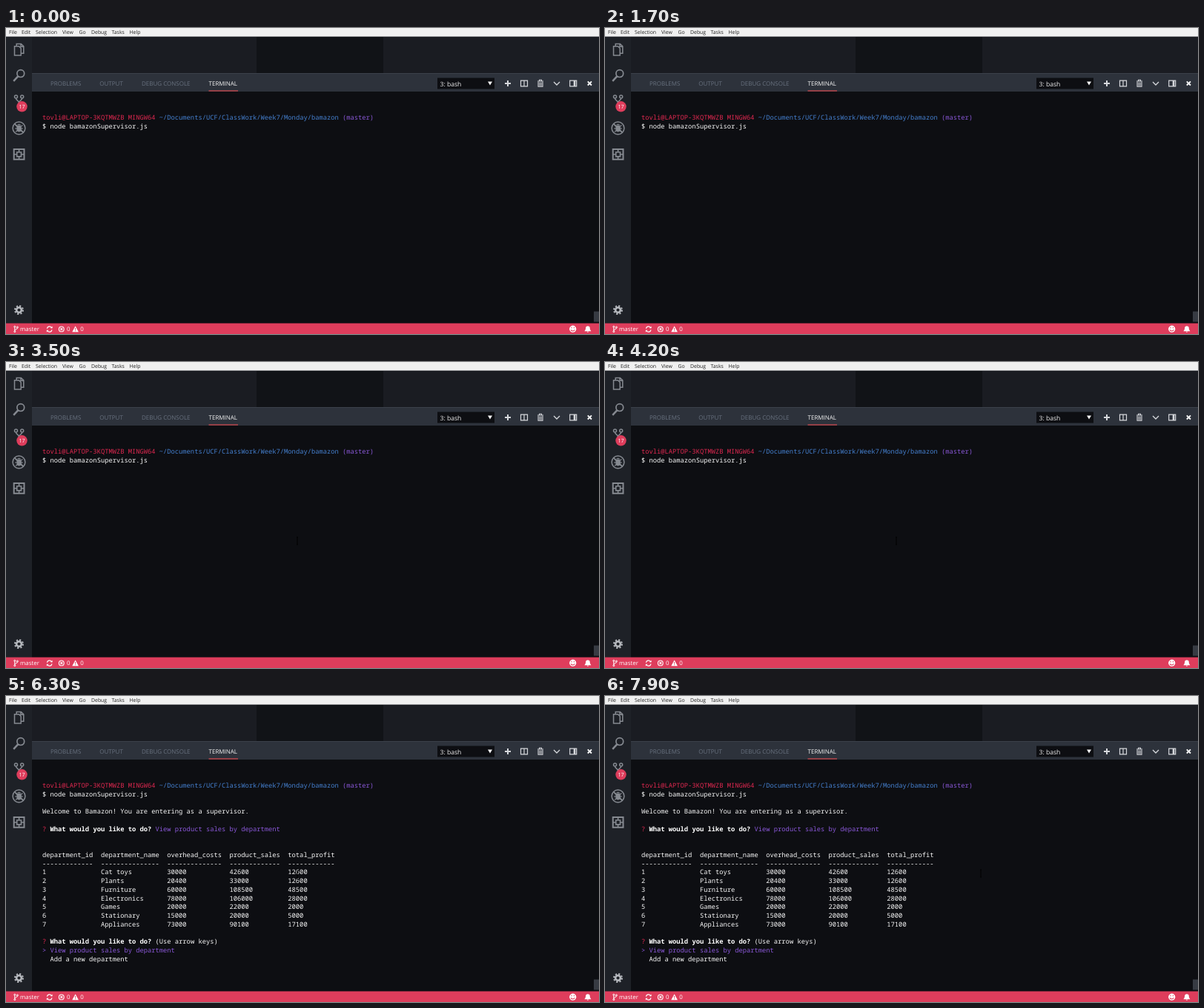
An HTML page that plays this animation: 800 by 414 pixels, repeating every 8000 ms.

```html
<!DOCTYPE html>
<html lang="en">
<head>
<meta charset="utf-8">
<title>Terminal session</title>
<style>
  html, body { margin: 0; width: 100%; height: 100%; overflow: hidden; background: #0d0e12; }
  svg { display: block; width: 100vw; height: 100vh; }
  text { white-space: pre; text-rendering: geometricPrecision; font-family: "Open Sans", "Noto Sans", sans-serif; }
  #terminal text { font: 500 8.78px "Noto Sans Mono", "DejaVu Sans Mono", monospace; }
  .line { fill: none; stroke-width: 1.5; }
  .red { fill: #e02850; }
  .blue { fill: #4580d0; }
  .purple { fill: #8a58d8; }
  .white { fill: #f8f8f8; }
  .bold { fill: #fff; font-weight: 700; }
</style>
</head>
<body>
<svg viewBox="0 0 800 414">
  <rect width="800" height="414" fill="#0d0e12"/>
  <rect x="35" y="11" width="765" height="50" fill="#1a1c22"/>
  <rect x="338" y="12" width="171" height="49" fill="#111317"/>
  <rect x="35" y="61" width="765" height="25" fill="#2d323b"/>
  <rect x="35" y="61" width="765" height="1" fill="#3b414b"/>
  <rect y="11" width="35" height="389" fill="#1e2127"/>
  <rect width="800" height="11.6" fill="#f0f0f0"/>
  <rect y="399.5" width="800" height="14.5" fill="#de3d5c"/>
  <rect x="793" y="383.5" width="7" height="14" fill="#373b43"/>

  <g id="menu" fill="#222" font-size="6.9"></g>
  <g id="tabs" font-size="8"></g>
  <rect x="273.5" y="84.4" width="39.5" height="1.2" fill="#d84a50"/>

  <rect x="582" y="67.5" width="77" height="15" fill="#0d0e12"/>
  <text x="585.5" y="78.6" font-size="8.6" fill="#f0f0f0">3: bash</text>
  <path d="M650 72.6h6l-3 5z" fill="#f4f4f4"/>

  <!-- Panel actions -->
  <g class="line" stroke="#d6d8dc">
    <path d="M677 71v8M673 75h8" stroke-width="2"/>
    <path d="M694.5 71.2h9v7.6h-9zM699 71v8M694 71.2h10" stroke-width="1.2"/>
    <path d="M717 72h8M719.5 71.5v-1.3h3v1.3M718 73v6.2h6V73M720 73.5v5M722 73.5v5" stroke-width="1.1"/>
    <path d="M739 73l4 4 4-4" stroke-width="1.3"/>
    <path d="M760.7 71.2h9v7.6h-9z" stroke-width="1.2"/>
    <path d="M767 71v8" stroke-width="2.6"/>
    <path d="M784.8 72.3l5.2 5.2m0-5.2l-5.2 5.2" stroke="#fff" stroke-width="1.8"/>
  </g>

  <!-- Activity bar -->
  <g class="line" stroke="#868a91">
    <path d="M14.2 24.5v-3h6.2l3.4 3.4v9.3h-3M20 21.5v3.7h3.8M11.5 24.7h6l2.7 2.8v9.4h-8.7z"/>
    <circle cx="19.8" cy="61.6" r="4.9" stroke-width="1.7"/>
    <path d="M16.2 65.4l-6 6.4" stroke-width="2.5"/>
    <circle cx="13.5" cy="93" r="2"/><circle cx="21.7" cy="93" r="2"/>
    <path d="M13.5 95.2c0 3 4 2.5 4 6.3M21.7 95.2c0 3-4.2 2.5-4.2 6.3"/>
    <circle cx="17.5" cy="135.5" r="8.4"/>
    <path d="M11.6 129.7l12 12" stroke-width="1.7"/>
    <ellipse cx="17.6" cy="136" rx="2.6" ry="3.8" fill="#868a91"/>
    <path d="M12 136h11M13 131.5l2.5 2M22.4 131.5l-2.5 2M13 140.5l2.5-2M22.4 140.5l-2.5-2M15.5 131.5q2-2.4 4.2 0" stroke-width="1.1"/>
    <path d="M10.7 164h13.8v13.8H10.7z" stroke-width="2"/>
    <path d="M14.7 168h5.8v5.8h-5.8zM17.6 164v4M10.7 171h4M17.6 174v4M20.5 171h4" stroke-width="1.7"/>
    <circle cx="17.5" cy="381.5" r="3.4" stroke="#b4b7bc" stroke-width="2.7"/>
    <circle cx="17.5" cy="381.5" r="5.5" stroke="#b4b7bc" stroke-width="2" stroke-dasharray="2.16 2.16"/>
  </g>
  <circle cx="21.5" cy="106.3" r="7.2" fill="#de3d5c"/>
  <text x="21.5" y="108.9" font-size="7.2" fill="#fff" text-anchor="middle">17</text>

  <!-- Status bar -->
  <g class="line" stroke="#fff" stroke-width="1">
    <path d="M11.8 405v5.2M15.4 405.8c0 2.4-3.6 1.4-3.6 3.6" stroke-width="1"/>
    <g stroke-width="1"><circle cx="11.8" cy="404.2" r="1"/><circle cx="15.4" cy="404.9" r="1"/><circle cx="11.8" cy="410.7" r="1"/></g>
    <path d="M55.4 406.7a3.3 3.3 0 0 1 6.1-1.2M62 408.3a3.3 3.3 0 0 1-6.1 1.2" stroke-width="1.2"/>
    <path d="M62.6 403.4v2.8h-2.8zM54.8 411.6v-2.8h2.8z" fill="#fff" stroke="none"/>
    <circle cx="74.8" cy="407.4" r="3.4" stroke-width="1.1"/>
    <path d="M73.3 405.9l3 3m0-3l-3 3" stroke-width="1.1"/>
  </g>
  <path d="M93.6 403.2l4.3 8h-8.6z" fill="#fff"/>
  <path d="M93.6 405.8v2.6M93.6 409.2v1" stroke="#de3d5c" stroke-width="1"/>
  <g font-size="7.9" fill="#fff">
    <text x="19" y="410.3">master</text><text x="82" y="410.3">0</text><text x="100.3" y="410.3">0</text>
  </g>
  <circle cx="764.7" cy="407.2" r="4.6" fill="#fff"/>
  <path d="M762 408.4q2.7 3.2 5.4 0M763 404.8v1.5M766.4 404.8v1.5" class="line" stroke="#de3d5c" style="stroke-width:1.1"/>
  <path d="M780.4 410.2q1.7-1.3 1.7-4.2a2.8 2.8 0 0 1 5.6 0q0 2.9 1.7 4.2zM783.6 410.8h2.6q-1.3 2-2.6 0z" fill="#fff"/>

  <g id="terminal"></g>
  <path id="pointer" d="M-1-5h2M0-5V5M-1 5h2" stroke="#000" stroke-width=".9" fill="none"/>
</svg>
<script>
const LOOP = 8000, MENU_AT = 4300, TABLE_AT = 5700, POINTER_AT = 2200;
const LEFT = 49, CELL = 5.268, BASELINE = 123.8, ROW = 11.75;
const byId = id => document.getElementById(id);

function addText(parent, x, y, spans) {
  const el = document.createElementNS("http://www.w3.org/2000/svg", "text");
  el.setAttribute("x", x);
  el.setAttribute("y", y);
  for (const [style, content] of spans) {
    const span = document.createElementNS(el.namespaceURI, "tspan");
    span.setAttribute("class", style);
    span.textContent = content;
    el.append(span);
  }
  parent.append(el);
  return el;
}

[["File", 4], ["Edit", 21], ["Selection", 40], ["View", 76], ["Go", 98.5],
 ["Debug", 115], ["Tasks", 142.5], ["Help", 166.5]]
  .forEach(([label, x]) => addText(byId("menu"), x, 8.4, [["", label]]));

[["PROBLEMS", 60], ["OUTPUT", 126.3], ["DEBUG CONSOLE", 183], ["TERMINAL", 273.5]]
  .forEach(([label, x]) => addText(byId("tabs"), x, 77.8, [["", label]])
    .setAttribute("fill", label === "TERMINAL" ? "#f4f4f4" : "#68717f"));

const lines = [];
function print(row, spans, from = 0, until = LOOP) {
  const el = addText(byId("terminal"), LEFT, BASELINE + row * ROW, spans);
  lines.push({ el, from, until });
}

function printMenu(row, from, until) {
  print(row, [["red", "? "], ["bold", "What would you like to do?"], ["white", " (Use arrow keys)"]], from, until);
  print(row + 1, [["purple", "> View product sales by department"]], from, until);
  print(row + 2, [["white", "  Add a new department"]], from, until);
}

print(0, [["red", "tovli@LAPTOP-3KQTMWZB MINGW64 "],
  ["blue", "~/Documents/UCF/ClassWork/Week7/Monday/bamazon "], ["purple", "(master)"]]);
print(1, [["white", "$ node bamazonSupervisor.js"]]);
print(3, [["white", "Welcome to Bamazon! You are entering as a supervisor."]], MENU_AT);
printMenu(5, MENU_AT, TABLE_AT);
print(5, [["red", "? "], ["bold", "What would you like to do? "],
  ["purple", "View product sales by department"]], TABLE_AT);

const headers = ["department_id", "department_name", "overhead_costs", "product_sales", "total_profit"];
const departments = [
  ["Cat toys", 30000, 42600], ["Plants", 20400, 33000], ["Furniture", 60000, 108500],
  ["Electronics", 78000, 106000], ["Games", 20000, 22000], ["Stationary", 15000, 20000],
  ["Appliances", 73000, 90100]
];
const table = [
  headers,
  headers.map(name => "-".repeat(name.length)),
  ...departments.map(([name, costs, sales], i) => [i + 1, name, costs, sales, sales - costs])
];
table.forEach((cells, i) => {
  const content = cells.map((cell, c) => String(cell).padEnd(headers[c].length + 2)).join("");
  print(8 + i, [["white", content]], TABLE_AT);
});
printMenu(18, TABLE_AT, LOOP);

function render(now) {
  const t = now % LOOP;
  for (const { el, from, until } of lines) {
    el.setAttribute("visibility", t >= from && t < until ? "visible" : "hidden");
  }
  const p = Math.min(1, Math.max(0, (t - 6700) / 500));
  const ease = p * p * (3 - 2 * p);
  const pointer = byId("pointer");
  pointer.setAttribute("transform", `translate(${393 + 114 * ease} ${242 - 2 * ease})`);
  pointer.setAttribute("visibility", t >= POINTER_AT ? "visible" : "hidden");
}

const start = performance.now();
function tick() {
  render(performance.now() - start);
  requestAnimationFrame(tick);
}
tick();
</script>
</body>
</html>
```
